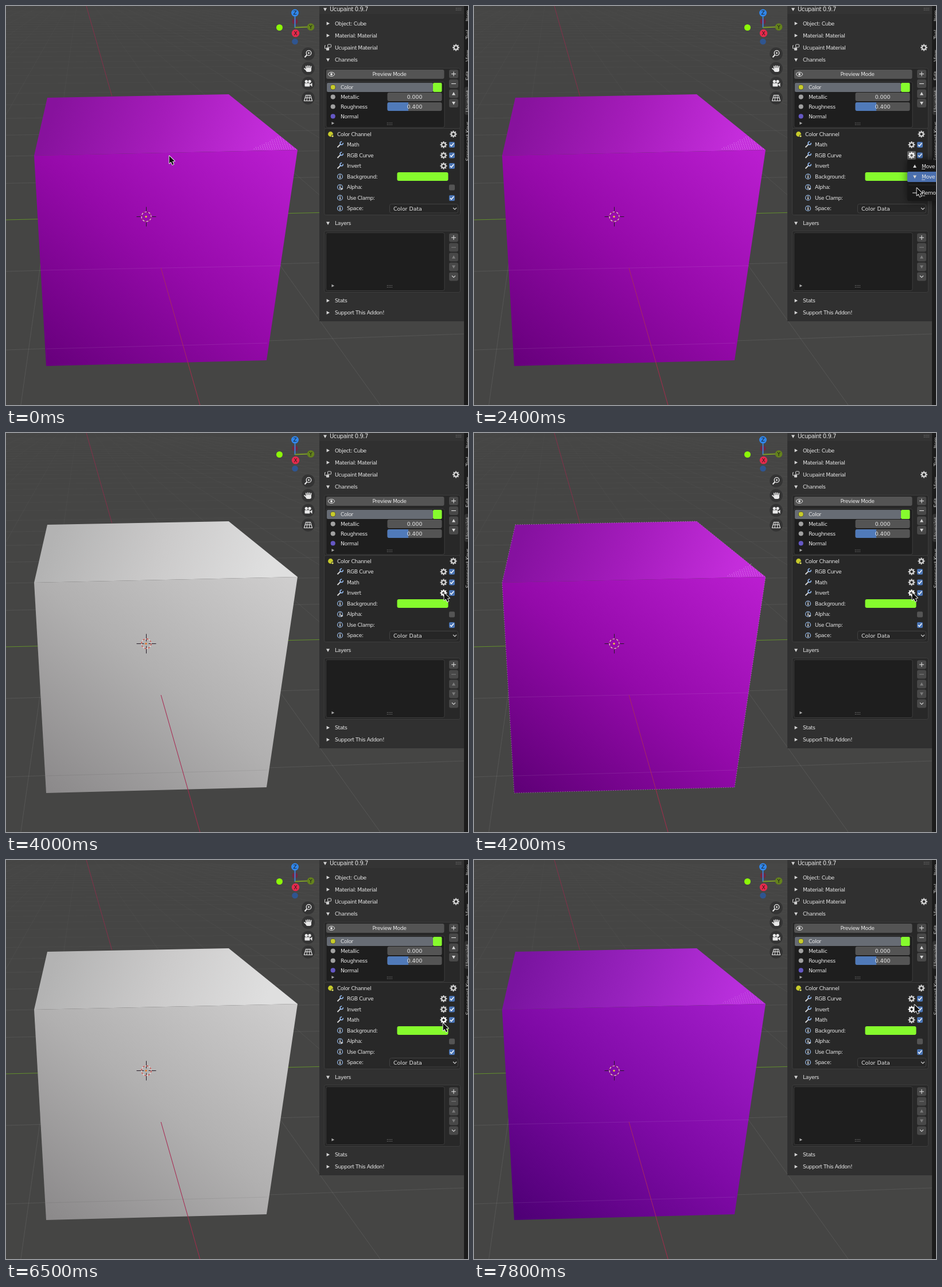
An HTML page with a canvas that plays this animation: 805x696 px, repeating every 8000 ms.

```html
<!DOCTYPE html>
<html lang="en">
<head>
<meta charset="utf-8">
<title>Modifier order</title>
<style>
html, body { margin: 0; width: 100%; height: 100%; overflow: hidden; background: #454544; }
canvas { display: block; }
</style>
</head>
<body>
<canvas id="stage" width="805" height="696"></canvas>
<script>
const c = document.getElementById('stage').getContext('2d');
const LOOP = 8000, STEP = 100, TAU = Math.PI * 2;
const FONT = '"DejaVu Sans", sans-serif';
const ROWS = [242, 260.5, 279];
const GREEN = '#86fb2d', BLUE = '#4a74b4', WHITE = '#e6e6e6';

// Pointer path: time, x, y
const PATH = [
  [0, 284, 261], [300, 284, 261], [600, 560, 302], [900, 770, 325], [1000, 770, 325],
  [1200, 763, 258], [1800, 763, 258], [1900, 766, 274], [2100, 768, 293], [2400, 771, 317],
  [2700, 773, 284], [3400, 773, 284], [3700, 763, 279], [4200, 763, 278], [5000, 763, 278],
  [5300, 769, 299], [5600, 769, 299], [5800, 760, 287], [6400, 760, 287], [6500, 761, 284],
  [6800, 761, 284], [7100, 765, 262], [7600, 765, 262], [7800, 767, 252], [8000, 767, 252]
];
// Open menus: start, end, row of the gear
const MENUS = [[1300, 2800, 1], [4500, 5600, 2], [7400, 7700, 1]];
// Cube looks: start, kind
const LOOKS = [[-3000, 'pink'], [2800, 'white'], [4100, 'pink2'], [5700, 'white'], [6900, 'violet']];
const SHADES = {
  pink: { top: ['#87129d', '#a51cba', '#c42ddb'], front: ['#68007d', '#960aaa', '#b91dcf'] },
  pink2: { top: ['#85119f', '#a41cbc', '#c42ddb'], front: ['#600078', '#940aaa', '#b91dcf'] },
  violet: { top: ['#7a14a0', '#9722bd', '#b92fdc'], front: ['#4f0076', '#7f0aa6', '#a41dcb'] },
  white: { top: ['#b3b3b3', '#cbcaca', '#dfdfdf'], front: ['#8c8a8b', '#b1b0b0', '#cecdcd'] }
};

function line(color, width, ...p) {
  c.strokeStyle = color; c.lineWidth = width;
  c.beginPath();
  for (let i = 0; i < p.length; i += 2) c.lineTo(p[i], p[i + 1]);
  c.stroke();
}
function poly(...p) {
  c.beginPath();
  for (let i = 0; i < p.length; i += 2) c.lineTo(p[i], p[i + 1]);
  c.closePath();
}
function disc(x, y, r, fill) {
  c.fillStyle = fill;
  c.beginPath(); c.arc(x, y, r, 0, TAU); c.fill();
}
function ring(x, y, r, color, width) {
  c.strokeStyle = color; c.lineWidth = width;
  c.beginPath(); c.arc(x, y, r, 0, TAU); c.stroke();
}
function box(x, y, x2, y2, fill, border, r = 3) {
  c.beginPath(); c.roundRect(x, y, x2 - x, y2 - y, r);
  c.fillStyle = fill; c.fill();
  if (border) { c.strokeStyle = border; c.lineWidth = 1; c.stroke(); }
}
function text(s, x, y, { size = 9.2, gap = -0.4, align = 'left', color = WHITE } = {}) {
  c.font = `${size}px ${FONT}`;
  c.letterSpacing = gap + 'px';
  c.textAlign = align;
  c.fillStyle = color;
  c.fillText(s, x, y + 3.4);
}
// Triangle pointing right (0), down (1), left (2) or up (3)
function tri(x, y, dir, color = '#d6d6d6', r = 3) {
  c.save();
  c.translate(x, y); c.rotate(dir * Math.PI / 2);
  poly(-r * .8, -r, r, 0, -r * .8, r);
  c.fillStyle = color; c.fill();
  c.restore();
}
function chevron(x, y, r = 3) {
  line('#cccccc', 1.2, x - r, y - r / 2, x, y + r / 2, x + r, y - r / 2);
}
function gear(x, y, color = '#d2d2d2') {
  ring(x, y, 3.4, color, 2.3);
  for (let i = 0; i < 8; i++) {
    const a = i * TAU / 8, u = Math.cos(a), v = Math.sin(a);
    line(color, 2, x + u * 4, y + v * 4, x + u * 6, y + v * 6);
  }
}
function grip(x, y) {
  c.fillStyle = '#9a9a9a';
  for (let i = 0; i < 8; i++) c.fillRect(x - 4 + (i % 4) * 2.6, y - 1.5 + (i >> 2) * 3, 1, 1);
}
function sign(x, y, plus, color = '#dddddd') {
  line(color, 1.1, x - 4, y, x + 4, y);
  if (plus) line(color, 1.1, x, y - 4, x, y + 4);
}

/* ---------- viewport ---------- */

function grid() {
  for (let n = -30; n <= 2; n++) {
    const y = (373 + 10.6 * n) / (1 - .1715 * n);
    const a = Math.max(.025, .085 + n * .009);
    line(n ? `rgba(255,255,255,${Math.min(a, .085)})` : '#628f2c', 1, 0, y, 805, y - 805 * (y + 62) * 5.3e-5);
  }
  for (let n = -10; n <= 12; n++) {
    if (!n) continue;
    const g = c.createLinearGradient(0, 0, 0, 500);
    g.addColorStop(0, 'rgba(255,255,255,.01)');
    g.addColorStop(1, 'rgba(255,255,255,.085)');
    const k = (269.5 + 210 * n - 128) / 491;
    line(g, 1, 128 + k * 36, 0, 128 + k * 732, 696);
  }
  line('#84304a', 1, 140, 0, 184.5, 157);
  line('#a62b4c', 1, 270, 457, 338, 696);
}

function shade(colors, x, y, x2, y2) {
  const g = c.createLinearGradient(x, y, x2, y2);
  colors.forEach((s, i) => g.addColorStop(i / 2, s));
  c.fillStyle = g;
}

function cube(t) {
  const [since, kind] = LOOKS.filter(l => l[0] <= t).pop();
  const pale = kind === 'white', age = t - since, s = SHADES[kind];
  poly(72, 160, 388, 154, 508, 251, 49, 261);
  shade(s.top, 90, 160, 440, 285); c.fill();
  poly(49, 261, 508, 251, 454, 618, 70, 628);
  shade(s.front, 100, 640, 440, 215); c.fill();

  const faint = pale ? 'rgba(0,0,0,.07)' : 'rgba(255,255,255,.09)';
  if (!pale) line(faint, 1, 60, 461, 480, 453);
  line(faint, 1, 70, 598, 455, 588);
  line(pale ? '#a8234e' : '#a72a62', 1, 270, 457, 317, 622);

  if (!pale) {
    const left = kind === 'pink' ? 428 : kind === 'violet' ? 430 : 438;
    c.setLineDash([1, 3]);
    for (let y = 228.5, i = 0; y < 251; y += 2.6, i++) {
      c.lineDashOffset = i * 1.7;
      line(`rgba(238,190,248,${kind === 'violet' ? .45 : .75})`, 1,
        left + (250 - y) * 2.1, y, 387 + (y - 154) * 1.237, y);
    }
    c.lineDashOffset = 0;
    c.setLineDash([]);
  }
  if (age < 500) {
    c.globalAlpha = 1 - age / 600;
    if (!pale) c.setLineDash([1, 3]);
    poly(72, 160, 388, 154, 508, 251, 454, 618, 70, 628, 49, 261);
    c.strokeStyle = pale ? '#9b2fb8' : '#c9a5cf'; c.lineWidth = 1; c.stroke();
    c.setLineDash([]);
    c.globalAlpha = 1;
  }
  marker(244.5, 367.5, pale);
}

function marker(x, y, pale) {
  const inner = pale ? 4 : 10;
  for (let i = 0; i < 4; i++) {
    const u = [1, 0, -1, 0][i], v = [0, 1, 0, -1][i];
    line('#241a26', 1, x + u * inner, y + v * inner, x + u * 17, y + v * 17);
  }
  ring(x, y, 8.5, pale ? '#e9e6e4' : '#f3e3ce', 1.2);
  c.setLineDash([3.3, 3.4]);
  ring(x, y, 8.5, pale ? '#c8413c' : '#85105f', 1.3);
  c.setLineDash([]);
  disc(x - .5, y, 1.7, pale ? '#e27b32' : '#e5c93c');
}

function gizmo() {
  const x = 503.5;
  disc(x, 27, 5, '#74263f');
  line('#3c82d6', 2, x, 12, x, 38);
  line('#7c9c28', 2, x, 37.5, 526, 36.5);
  disc(x, 62, 5.3, '#2f5590');
  disc(476.5, 37.5, 5.5, '#8cf808');
  disc(531, 36.5, 6.3, '#64821c');
  disc(x, 12, 6.5, '#3086ea');
  disc(504.5, 47.5, 6.7, '#e62a4c');
  const style = { size: 9, gap: 0, align: 'center', color: '#1c1c1c' };
  text('Z', x, 12, style); text('Y', 531, 36.5, style); text('X', 504.5, 47.5, style);
}

function navButtons() {
  const x = 526.5, w = '#e8e8e8';
  for (const y of [83.5, 109, 135, 160.5]) disc(x, y, 11.3, '#343434');
  // zoom
  ring(x + 1, 82, 4.3, w, 1.3);
  line(w, 2, x - 2, 85, x - 6, 89.5);
  line(w, 1, x - 1, 82, x + 3, 82); line(w, 1, x + 1, 80, x + 1, 84);
  // pan
  c.lineCap = 'round';
  for (let i = 0; i < 4; i++) line(w, 1.8, x - 3 + i * 2.5, 109, x - 3.6 + i * 2.9, 104 + Math.abs(i - 1.4) * .9);
  line(w, 1.8, x - 3, 112, x - 6.5, 109);
  c.lineCap = 'butt';
  box(x - 4, 108, x + 5.5, 115, w, null, 3);
  // camera
  disc(x - 3.2, 131.5, 2.6, w); disc(x + 2.6, 131.5, 2.6, w);
  box(x - 6, 134.5, x + 3, 140.5, w, null, 1);
  poly(x + 3, 137, x + 7, 134, x + 7, 141); c.fillStyle = w; c.fill();
  // perspective
  poly(x - 4, 155.5, x + 4, 155.5, x + 7, 165.5, x - 7, 165.5);
  c.strokeStyle = w; c.lineWidth = 1.1; c.stroke();
  line(w, 1, x - 5.5, 160, x + 5.5, 160);
  line(w, 1, x - 1.5, 155.5, x - 2.5, 165.5); line(w, 1, x + 1.5, 155.5, x + 2.5, 165.5);
}

/* ---------- side panel ---------- */

function tabs() {
  c.fillStyle = '#1c1c1c'; c.fillRect(798, 0, 7, 696);
  box(799, 141, 815, 190, '#333333', null, 4);
  const names = [['Item', 17], ['Tool', 50], ['View', 87], ['Edit', 122], ['Ucupaint', 166], ['Screencast Keys', 236]];
  for (const [name, y] of names) {
    c.save();
    c.translate(804.5, y); c.rotate(-Math.PI / 2);
    text(name, 0, 0, { align: 'center', color: '#c4c4c4' });
    c.restore();
  }
}

function wrench(x, y) {
  line('#d8d8d8', 1.8, x - 4.5, y + 4.5, x + 1.5, y - 1.5);
  c.strokeStyle = '#8fb4e8'; c.lineWidth = 1.7;
  c.beginPath(); c.arc(x + 2.7, y - 2.7, 2.6, -.2, 4.9); c.stroke();
}
function info(x, y) {
  ring(x, y, 4.4, '#8fb0dc', 1.3);
  c.fillStyle = '#e4e4e4';
  c.fillRect(x - .8, y - 2.8, 1.7, 1.4); c.fillRect(x - .8, y - .7, 1.7, 3.6);
}
function check(x, y, on = true) {
  box(x - 5, y - 5, x + 5, y + 5, on ? BLUE : '#545454', null, 2);
  if (on) line('#ffffff', 1.5, x - 3, y, x - 1, y + 2.4, x + 3.2, y - 2.8);
}
function button(y, draw) {
  box(772, y - 7.5, 788, y + 7.5, '#484848');
  draw(780, y);
}
function header(name, y, open) {
  tri(561, y, open ? 1 : 0);
  text(name, 573, y);
}
function field(value, y) {
  box(664.5, y - 7.5, 759.5, y + 7.5, '#545454');
  if (value === '0.400') {
    c.save();
    c.beginPath(); c.rect(664, y - 8, 37, 16); c.clip();
    box(664.5, y - 7.5, 759.5, y + 7.5, '#507ab9');
    c.restore();
  }
  text(value, 712, y, { size: 9.3, gap: 0, align: 'center' });
}

function panel() {
  c.fillStyle = '#303030'; c.fillRect(546, 0, 252, 550);
  c.fillStyle = '#343434'; c.fillRect(546, 0, 252, 14);
  tri(556, 6, 1);
  text('Ucupaint 0.9.7', 564, 5.5, { size: 10, gap: -.45 });
  grip(788, 5);
  header('Object: Cube', 30.5);
  header('Material: Material', 51.5);
  box(560.5, 67, 566.5, 72, '#303030', '#cfcfcf', 1);
  box(558, 72.5, 563, 77.5, '#cfcfcf', null, 1);
  line('#cfcfcf', 1, 557, 69, 555.5, 69, 555.5, 74, 558, 74);
  text('Ucupaint Material', 573, 72.5);
  gear(784, 72.5);
  header('Channels', 94, true);

  box(554.5, 108.5, 791.5, 213.5, '#282828', '#3d3d3d');
  box(558, 111, 763.5, 127, '#545454');
  text('Preview Mode', 668, 119, { align: 'center' });
  c.strokeStyle = WHITE; c.lineWidth = 1;
  c.beginPath(); c.ellipse(567, 119, 5.5, 3.5, 0, 0, TAU); c.stroke();
  disc(567, 119, 1.9, WHITE);
  box(557.5, 132.5, 764, 212, '#1e1e1e', '#3c3c3c');
  box(559, 134, 744, 150, '#676c74', null, 2);
  box(744, 134, 759.5, 150, GREEN, null, 2);
  [['Color', '#c7cb2b'], ['Metallic', '#a1a1a1'], ['Roughness', '#a1a1a1'], ['Normal', '#6558c4']].forEach(([name, color], i) => {
    const y = 141.7 + i * 16.9;
    disc(569.7, y, 4.6, '#161616'); disc(569.7, y, 4.1, color);
    text(name, 583, y);
  });
  field('0.000', 158.5);
  field('0.400', 175.5);
  tri(569.5, 204.5, 0, '#a8a8a8', 2.6);
  grip(668, 205);
  button(118.5, (x, y) => sign(x, y, true));
  button(135.5, (x, y) => sign(x, y));
  button(153, (x, y) => tri(x, y, 3));
  button(169.5, (x, y) => tri(x, y, 1));

  box(554.5, 213.5, 791.5, 364.5, '#282828', '#3d3d3d');
  disc(565.5, 223.5, 4.4, '#c7cb2b');
  disc(569, 227, 2.4, '#282828'); disc(569, 227, 1.6, '#e4e46a');
  text('Color Channel', 577, 223.5);
  gear(779.5, 223.5);
  ['Background:', 'Alpha:', 'Use Clamp:', 'Space:'].forEach((name, i) => {
    const y = 297.5 + i * 18.5;
    info(582, y);
    if (i === 1) tri(585.5, y + 3, 0, '#eeeeee', 2);
    text(name, 594, y);
  });
  box(681.5, 290, 770.5, 305, GREEN);
  check(777, 316.5, false);
  check(777, 335);
  box(668.5, 345.5, 787.5, 361, '#262626', '#414141');
  text('Color Data', 675, 353.5, { size: 9.4, gap: 0 });
  chevron(782, 353.5);

  header('Layers', 379, true);
  box(554.5, 392.5, 791.5, 499.5, '#282828', '#3d3d3d');
  box(557.5, 395.5, 764, 496.5, '#1e1e1e', '#3c3c3c');
  tri(569.5, 488, 0, '#a8a8a8', 2.6);
  grip(668, 488.5);
  button(404, (x, y) => sign(x, y, true));
  button(421, (x, y) => sign(x, y, false, '#7c7c7c'));
  button(438, (x, y) => tri(x, y, 3, '#7c7c7c'));
  button(455, (x, y) => tri(x, y, 1, '#7c7c7c'));
  button(472, (x, y) => chevron(x, y));
  header('Stats', 514);
  header('Support This Addon!', 535);
}

function modifiers(t, px, py, menu) {
  const names = t < 2800 ? ['Math', 'RGB Curve', 'Invert']
    : t < 5700 ? ['RGB Curve', 'Math', 'Invert'] : ['RGB Curve', 'Invert', 'Math'];
  names.forEach((name, i) => {
    const y = ROWS[i], open = menu && menu[2] === i;
    const hover = !menu && px > 754 && px < 771 && Math.abs(py - y) < 9;
    wrench(582, y);
    text(name, 594, y);
    if (open) box(755, y - 7.5, 770, y + 7.5, '#666666', null, 2);
    gear(762.5, y, open || hover ? '#ffffff' : undefined);
    check(777, y);
  });
}

/* ---------- menu and pointer ---------- */

function popup(t, py, row) {
  const y = ROWS[row];
  c.save();
  c.shadowColor = 'rgba(0,0,0,.55)'; c.shadowBlur = 14;
  box(755, y + 8, 830, y + 79.5, '#181818', null, 3);
  c.restore();
  const up = py > y + 9 && py < y + 28;
  const active = up ? 0 : py >= y + 28 ? 1 : -1;
  if (active >= 0) box(755, y + 10 + active * 18.5, 830, y + 28 + active * 18.5, '#4a6fae', null, 2);
  line('#2d2d2d', 1, 757, y + 51.5, 805, y + 51.5);
  tri(768, y + 19, 3); tri(768, y + 37.5, 1); sign(768, y + 65.5);
  [['Move Up', 19], ['Move Down', 37.5], ['Remove Modifier', 65.5]].forEach(([name, dy]) => {
    text(name, 780, y + dy);
    line(WHITE, .8, 780, y + dy + 5, 786, y + dy + 5);
  });
}

function pointerAt(t) {
  const i = PATH.findIndex(p => p[0] > t);
  const [t0, x0, y0] = PATH[i - 1], [t1, x1, y1] = PATH[i];
  const k = (t - t0) / (t1 - t0);
  return [x0 + (x1 - x0) * k, y0 + (y1 - y0) * k];
}

function pointer(x, y) {
  c.save();
  c.translate(x + .5, y + .5);
  poly(0, 0, 0, 13, 3, 10.3, 5.3, 15.4, 7.6, 14.4, 5.4, 9.5, 9.4, 9.2);
  c.lineJoin = 'round';
  c.strokeStyle = '#f2f2f2'; c.lineWidth = 1.8; c.stroke();
  c.fillStyle = '#101010'; c.fill();
  c.restore();
}

function draw(t) {
  const [px, py] = pointerAt(t);
  const menu = MENUS.find(m => t >= m[0] && t < m[1]);
  c.fillStyle = '#454544'; c.fillRect(0, 0, 805, 696);
  grid();
  cube(t);
  gizmo();
  navButtons();
  panel();
  tabs();
  modifiers(t, px, py, menu);
  if (menu) popup(t, py, menu[2]);
  pointer(px, py);
}

let last = -1;
const start = performance.now();
function tick() {
  const t = Math.floor(((performance.now() - start) % LOOP) / STEP) * STEP;
  if (t !== last) draw(last = t);
  requestAnimationFrame(tick);
}
tick();
</script>
</body>
</html>
```
